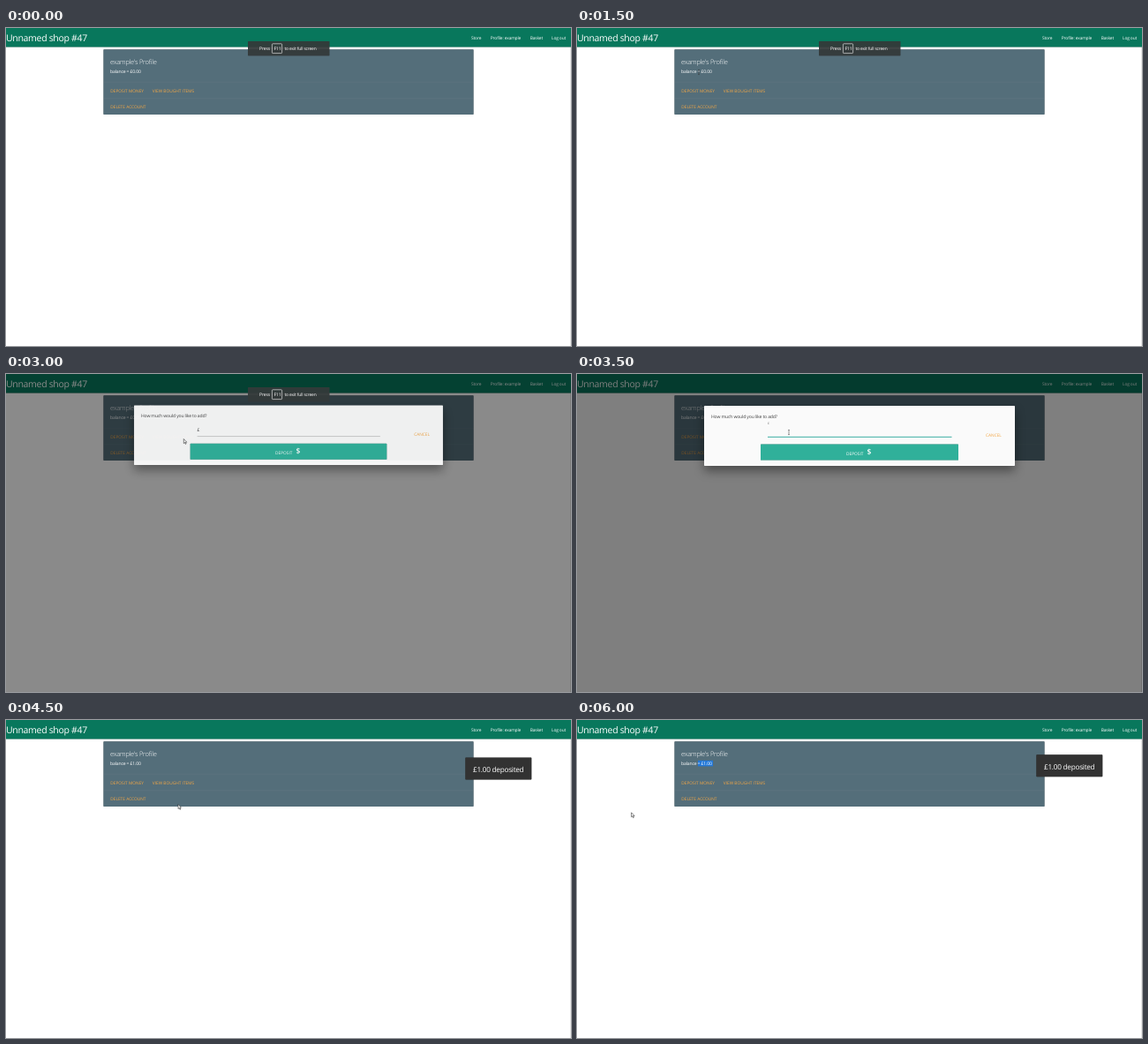
An HTML page for the animation above (6.5 s loop, 640 px wide and 360 px high).

```html
<!DOCTYPE html>
<html lang="en">
<head>
<meta charset="utf-8">
<title>Shop profile</title>
<style>
  html, body { margin: 0; width: 100%; height: 100%; overflow: hidden; background: #fff; }
  svg { display: block; width: 640px; height: 360px; }
  text { font: 5.1px "Open Sans", "Noto Sans", sans-serif; letter-spacing: -.03em; fill: #fff; text-rendering: geometricPrecision; }
  .brand { font-size: 10.5px; }
  .nav { font-size: 4.9px; }
  .title { font-size: 7.5px; font-weight: 300; }
  .link { font-size: 4.8px; letter-spacing: 0; fill: #f2a645; }
  .button { font-size: 4.8px; letter-spacing: 0; }
  .icon { font-size: 8.5px; font-weight: 600; }
  .note { font-size: 8.2px; }
  .dark { fill: #444; }
  .tiny { font-size: 3.6px; fill: #777; }
  .card { filter: drop-shadow(0 .7px .7px #0006); }
  .modal { filter: drop-shadow(0 6px 6px #0006); }
</style>
</head>
<body>
<svg viewBox="0 0 640 360">
  <rect width="640" height="360" fill="#fff"/>
  <rect x="639" y="22" width="1" height="338" fill="#e4e4e4"/>
  <rect class="card" width="640" height="21.5" fill="#08775c"/>
  <text class="brand" x="0" y="15">Unnamed shop #47</text>
  <g class="nav-items">
    <text class="nav" x="527" y="12.8">Store</text>
    <text class="nav" x="548.8" y="12.8">Profile: example</text>
    <text class="nav" x="593.7" y="12.8">Basket</text>
    <text class="nav" x="618" y="12.8">Log out</text>
  </g>

  <rect class="card" x="110.4" y="24.2" width="419.2" height="73.8" rx=".7" fill="#546e7a"/>
  <path d="M110.4 61.3h419.2M110.4 79.8h419.2" stroke="#a0a0a0" stroke-opacity=".2" stroke-width=".5"/>
  <text class="title" x="118" y="40.6">example's Profile</text>
  <rect id="selection" x="137" y="45.8" width="17" height="6.6" fill="#2378d8"/>
  <text id="balance" x="118" y="51"></text>
  <text class="link" x="118.3" y="72.8">DEPOSIT MONEY</text>
  <text class="link" x="165.8" y="72.8">VIEW BOUGHT ITEMS</text>
  <text class="link" x="118.3" y="91.1">DELETE ACCOUNT</text>

  <rect id="shade" width="640" height="360"/>
  <g id="modal">
    <rect class="modal" x="144" y="36" width="352" height="68" rx=".7" fill="#fafafa"/>
    <text class="dark" x="152" y="49.8">How much would you like to add?</text>
    <text id="label" x="216">£</text>
    <text id="amount" class="dark" x="216" y="66">1</text>
    <path id="underline" d="M216 71.3h208.5"/>
    <text class="link" x="463" y="70.5">CANCEL</text>
    <rect class="card" x="208" y="79.6" width="224" height="18" rx=".6" fill="#30b09a"/>
    <text class="button" x="305" y="91.8">DEPOSIT</text>
    <text class="icon" x="328.5" y="91.2">$</text>
  </g>

  <g id="hint">
    <rect x="274" y="15" width="92.5" height="16.4" rx=".6" fill="#343a3a" fill-opacity=".94"/>
    <text x="287" y="25">Press</text>
    <rect x="301.4" y="17.8" width="11.2" height="10.8" rx=".8" fill="none" stroke="#ddd" stroke-width=".7"/>
    <text x="303.4" y="25">F11</text>
    <text x="315.5" y="25" style="font-size:4.9px">to exit full screen</text>
  </g>

  <g id="toast">
    <rect class="card" x="520.3" y="42.4" width="75" height="25" rx=".7" fill="#323232"/>
    <text class="note" x="529" y="59.2">£1.00 deposited</text>
  </g>
  <path id="cursor" stroke-linejoin="round"/>
</svg>
<script>
const $ = id => document.getElementById(id);
const show = (id, on) => $(id).style.display = on ? "" : "none";
const set = (id, attrs) => Object.entries(attrs).forEach(([k, v]) => $(id).setAttribute(k, v));

const STEP = 500, STEPS = 13;
const SHAPES = {
  arrow: { d: "M0 0V5L1.2 4 2 5.9 2.8 5.5 2 3.7H3.5Z", fill: "#fff", stroke: "#222", "stroke-width": .55 },
  hand: { d: "M0 0Q.7-.5 1 .2V2L3 2.5Q3.5 3 3 5.3H.5L-1.2 3 0 3Z", fill: "#fff", stroke: "#222", "stroke-width": .45 },
  beam: { d: "M-.9-2.6H.9M0-2.6V2.6M-.9 2.6H.9", fill: "none", stroke: "#333", "stroke-width": .5 }
};
// Pointer shape and position for each screen refresh
const POINTER = [
  null, ["arrow", 230, 160], ["arrow", 171, 61], ["beam", 138, 50], ["hand", 150, 66],
  ["arrow", 137.3, 76], ["arrow", 201.3, 73.5], ["beam", 240, 66], ["hand", 310.5, 89],
  ["arrow", 195, 95.5], ["arrow", 168, 77], ["beam", 155, 49], ["arrow", 61.6, 104.8]
];

function draw(now) {
  const step = Math.floor(now / STEP) % STEPS;
  const opening = step === 6, open = step >= 6 && step <= 8, paid = step >= 9;

  $("balance").textContent = `balance = £${paid ? 1 : 0}.00`;
  show("selection", step === 12);
  show("hint", step <= 6);
  show("shade", open);
  show("modal", open);
  show("toast", paid);
  show("amount", step === 8);

  set("shade", { opacity: opening ? .46 : .5 });
  set("modal", {
    opacity: opening ? .95 : 1,
    transform: opening ? "translate(320 69.3) scale(.994) translate(-320 -70)" : ""
  });
  set("label", { y: opening ? 66 : 56.5, class: opening ? "dark" : "tiny" });
  set("underline", { stroke: opening ? "#9e9e9e" : "#26a69a", "stroke-width": opening ? .5 : .9 });
  set("toast", { transform: `translate(0 ${step > 9 ? -3.2 : 0})` });

  const pointer = POINTER[step];
  show("cursor", pointer);
  if (pointer) {
    const [shape, x, y] = pointer;
    set("cursor", { ...SHAPES[shape], transform: `translate(${x} ${y})` });
  }
}

const start = performance.now();
function tick() {
  draw(performance.now() - start);
  requestAnimationFrame(tick);
}
tick();
</script>
</body>
</html>
```
